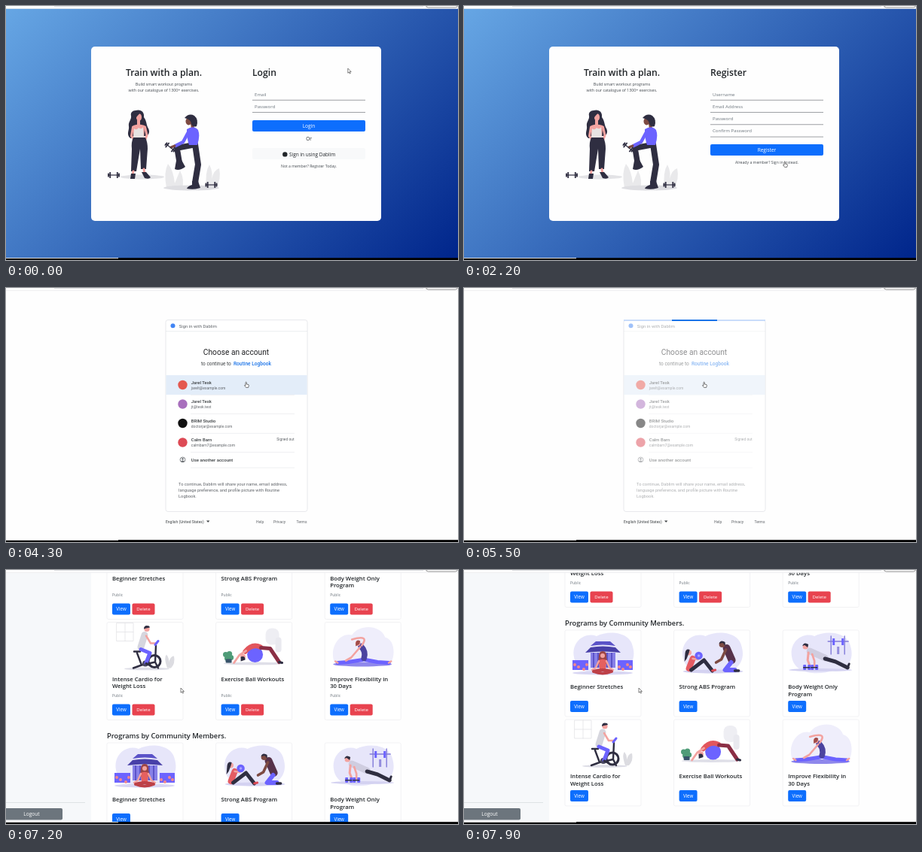
Write an HTML page that moves like this. It is 600 px wide and 338 px high and loops after 8 s.

```html
<!DOCTYPE html>
<html lang="en">
<head>
<meta charset="utf-8">
<title>Workout app walkthrough</title>
<style>
html, body { margin: 0; width: 100%; height: 100%; overflow: hidden; background: #fff; }
svg { display: block; width: 100vw; height: 100vh; }
text { font-family: "Open Sans", "Noto Sans", sans-serif; white-space: pre; }
.account text { font-family: Roboto, Arial, sans-serif; }
</style>
</head>
<body>
<svg id="stage" viewBox="0 0 600 338" preserveAspectRatio="none"></svg>
<script>
const LOOP = 8000, STEP = 100;
const INK = '#212529', BLUE = '#0d6efd', NAVY = '#2f2e41', VIOLET = '#6c63ff';
const SKIN = '#f3a3a0', BROWN = '#7d4a42', RED = '#dc4b56', HAZE = '#e7e6fa';

const text = (x, y, size, str, fill = INK, extra = '') =>
  `<text x="${x}" y="${y}" font-size="${size}" fill="${fill}" ${extra}>${str}</text>`;
const BOLD = 'font-weight="600"', MID = 'text-anchor="middle"', END = 'text-anchor="end"';
const box = (x, y, w, h, fill, r = 0, extra = '') =>
  `<rect x="${x}" y="${y}" width="${w}" height="${h}" rx="${r}" fill="${fill}" ${extra}/>`;
const dot = (x, y, r, fill) => `<circle cx="${x}" cy="${y}" r="${r}" fill="${fill}"/>`;
const oval = (x, y, rx, ry, fill) => `<ellipse cx="${x}" cy="${y}" rx="${rx}" ry="${ry}" fill="${fill}"/>`;
const shape = (d, fill) => `<path d="${d}" fill="${fill}"/>`;
const limb = (d, color, w) =>
  `<path d="${d}" fill="none" stroke="${color}" stroke-width="${w}" stroke-linecap="round" stroke-linejoin="round"/>`;
const group = (id, body, extra = '') => `<g id="${id}" ${extra}>${body}</g>`;
const button = (x, y, w, h, fill, label, size, color = '#fff') =>
  box(x, y, w, h, fill, 2) + text(x + w / 2, y + h / 2 + size * .36, size, label, color, MID);

// Login and register
function dumbbell(x, y, turn = 0) {
  const plates = [-7, -4.8, 4.8, 7].map(p => {
    const h = Math.abs(p) > 6 ? 5 : 8;
    return box(p - .9, -h / 2, 1.8, h, NAVY, .5);
  });
  return `<g transform="translate(${x} ${y}) rotate(${turn})">${box(-8, -.6, 16, 1.2, NAVY)}${plates.join('')}</g>`;
}

function athletes() {
  const standing =
    oval(181, 227.5, 29, 3, '#e3e3e6') +
    shape('M172 139C179 137 184 141 183 148C187 153 186 158 189 163C192 169 188 174 184 173L165 176C159 171 164 165 163 160C162 154 167 151 166 146C165 142 168 139 172 139Z', NAVY) +
    limb('M176 150V160', SKIN, 4) + oval(176.5, 148, 3.6, 5, SKIN) +
    shape('M169 159Q176 156 184 159L183 177H169Z', SKIN) +
    limb('M168.5 161L166.5 173L171 179', SKIN, 3) +
    limb('M184.5 161L187 172L184 180', SKIN, 3) +
    shape('M170 163Q173 166 176 162Q180 165 182 161L183 176H169Z', '#e7e3e2') +
    shape('M169 175H185Q188 181 188 190L186 217H179L178 190L173 220H166L167 190Q166 181 169 175Z', NAVY) +
    limb('M169 220L168 225', SKIN, 3) + limb('M183 217L184 224', SKIN, 3) +
    shape('M166 223H172L171 230H165Z', NAVY) + shape('M180 221L186 221L192 228Q190 231 184 229Z', NAVY) +
    shape('M168 143Q174 138 180 142Q173 144 170 157Q166 150 168 143Z', NAVY) +
    dumbbell(143, 225);
  const stepping =
    shape('M266 241Q264 221 270 211Q275 221 273 230Q276 218 283 216Q286 230 279 242Z', '#e9e9eb') +
    shape('M213 242Q209 221 215 210Q222 218 224 236L231 219Q237 230 234 243Z', '#e9e9eb') +
    oval(246, 242, 37, 3.5, '#dedee2') +
    limb('M251 184L255 211L251 235', NAVY, 8) + limb('M248 185L227 189L230 207', NAVY, 7.5) +
    shape('M226 206L233 205L238 214Q230 220 224 217Z', NAVY) +
    shape('M247 233H255L258 242Q249 245 240 243Q241 240 247 238Z', NAVY) +
    limb('M247 156L248 164', BROWN, 4) + oval(242.5, 153.5, 4, 5, BROWN) +
    shape('M237 149Q243 142 250 146Q256 151 253 160Q248 162 246 157Q246 151 237 149Z', NAVY) +
    shape('M240 164Q249 158 255 165Q258 173 254 185H243Q240 177 240 164Z', VIOLET) +
    limb('M242 168L235 181L225 186', VIOLET, 4.5) + limb('M224 186L219 188', BROWN, 3) +
    dumbbell(218, 188, 38) + dumbbell(272.5, 238);
  return standing + stepping;
}

const fields = (names, gap) => names.map((name, i) =>
  text(330, 119.5 + i * gap, 6.1, name, '#6c757d') +
  box(327, 124.8 + i * gap, 150, .8, '#85898e')).join('');

function authPages() {
  return group('auth',
    box(0, 0, 600, 338, 'url(#sky)') + box(113, 54, 385, 232, '#fefefe', 5) +
    text(209.5, 92.5, 12.2, 'Train with a plan.', INK, BOLD + MID) +
    text(209.5, 106, 5.3, 'Build smart workout programs', '#444a50', MID) +
    text(209.5, 114.4, 5.3, 'with our catalogue of 1300+ exercises.', '#444a50', MID) +
    athletes() +
    group('login',
      text(327, 92.5, 12.2, 'Login', INK, BOLD) + fields(['Email', 'Password'], 16.2) +
      button(327, 152, 150, 15, BLUE, 'Login', 6.5) +
      text(402, 178.5, 6.5, 'Or', INK, MID) +
      box(327, 189, 150, 15, '#f8f9fa', 2, 'id="sso"') + dot(370.3, 197.4, 3.2, INK) +
      text(376, 199.6, 6.5, 'Sign in using Dablim') +
      text(402, 215.3, 5.1, 'Not a member? Register Today.', '#444a50', MID)) +
    group('register',
      text(327, 92.5, 12.2, 'Register', INK, BOLD) +
      fields(['Username', 'Email Address', 'Password', 'Confirm Password'], 16.3) +
      button(327, 184, 150, 15, BLUE, 'Register', 6.5) +
      text(402, 210, 5.15, 'Already a member? Sign in instead.', '#444a50', MID)));
}

// Account chooser
function accountPage() {
  const people = [
    ['Jarel Tesk', 'jarelt@example.com', '#e4584f'],
    ['Jarel Tesk', 'jt@tesk.test', '#a86fbd'],
    ['BRIM Studio', 'doctorjar@example.com', '#111'],
    ['Calm Barn', 'calmbarn7@example.com', '#dd4a55']];
  const rows = people.map(([name, mail, color], i) => {
    const y = 129 + i * 25.5;
    return dot(234.5, y, 6.2, color) + text(245.8, y - 1.2, 5.9, name, '#3c4043', 'font-weight="500"') +
      text(245.8, y + 5.5, 5, mail, '#5f6368') + box(245, y + 12.9, 138, .6, '#e4e6e9');
  }).join('');
  const note = ['To continue, Dablim will share your name, email address,',
    'language preference, and profile picture with Routine', 'Logbook.'];
  const grey = '#5f6368';
  return group('account',
    box(0, 0, 600, 338, '#fefefe') +
    group('panel',
      box(212, 42.5, 188, 255, '#fff', 3, 'stroke="#e2e4e8" stroke-width=".8"') +
      group('choices',
        dot(221.5, 50.3, 3, '#4285f4') + text(229.8, 52.6, 5.9, 'Sign in with Dablim', grey) +
        box(212, 57, 188, .6, '#e2e4e8') +
        text(305.5, 89.3, 10.2, 'Choose an account', '#202124', MID) +
        text(259, 103.4, 6.5, 'to continue to', '#3c4043') +
        text(302, 103.4, 6.6, 'Routine Logbook', '#1a73e8', 'font-weight="500"') +
        box(212.4, 116, 187.2, 26, '#e3edf9', 0, 'id="row"') + rows +
        text(382.5, 202.6, 4.9, 'Signed out', grey, END) +
        `<circle cx="234.5" cy="228.5" r="3.4" fill="none" stroke="${grey}" stroke-width=".8"/>` +
        dot(234.5, 227.4, 1.2, grey) + shape('M232.3 230.8Q234.5 228.4 236.7 230.8Q234.5 232.4 232.3 230.8Z', grey) +
        text(245.8, 230.6, 6, 'Use another account', '#3c4043', 'font-weight="500"') +
        box(245, 238.8, 138, .6, '#e4e6e9') +
        note.map((line, i) => text(229, 262.5 + i * 8.3, 5.75, line, grey)).join('')) +
      group('footer',
        text(212, 312.6, 5, 'English (United States)', '#3c4043') + shape('M266 309.6H270.4L268.2 312Z', '#3c4043') +
        text(332, 312.6, 5, 'Help', grey) + text(355, 312.6, 5, 'Privacy', grey) + text(399.5, 312.6, 5, 'Terms', grey, END)) +
      group('progress', box(212, 42, 188, 2, '#c9dcfa') + box(212, 42, 60, 2, '#1a73e8', 0, 'id="bar"'))),
    'class="account"');
}

// Program thumbnails, in card coordinates
const blob = shape('M12 36C8 16 26 2 42 8C58 0 86 2 90 22C96 42 82 57 66 54C48 60 16 60 12 36Z', HAZE);
const thumbs = [
  blob + oval(50, 57, 40, 2.5, '#d8d6f3') +
    shape('M27 30Q50 27 74 30L67 23Q50 20 34 23Z', '#4840a8') + shape('M34 21Q50 18 67 21L60 15H41Z', '#5b53c8') +
    box(34, 30, 33, 20, '#8780e8') + [37, 43, 55, 61].map(x => box(x, 30, 2, 20, '#5b53c8')).join('') +
    box(10, 40, 21, 13, VIOLET) + box(70, 40, 20, 13, VIOLET) +
    [13, 18, 25, 29, 72, 77, 83, 87].map((x, i) => dot(x, 46 + i % 3 * 3, 2, '#f2878c')).join('') +
    shape('M45 35Q45 28 50 28Q56 28 55 36L57 45H44Z', '#9c4545') + dot(50, 34, 3, SKIN) +
    shape('M45 40Q50 37 55 40L54 53H46Z', '#e5605f') +
    limb('M45 41L41 50L36 53M55 41L59 50L64 53', SKIN, 2.4) + limb('M38 55Q50 51 62 55Q50 60 38 55', '#bd4047', 4),
  blob + oval(52, 55, 40, 2.5, '#d4d2f1') +
    limb('M25 38L20 51', '#e55c63', 8) + limb('M23 53L40 40L51 54', NAVY, 5) + limb('M51 54L55 53', RED, 3) +
    limb('M25 38L32 39', SKIN, 2.5) + dot(20, 30, 3.4, SKIN) +
    shape('M15 30Q16 24 21 26L20 30L17 38L14 42Z', NAVY) + dot(33, 34, 5.2, VIOLET) + dot(33, 34, 1.8, '#a9a4ff') +
    limb('M70 24L77 40', '#57324a', 10) + limb('M76 43L68 53H81', VIOLET, 6) + limb('M81 54L86 54', NAVY, 3.5) +
    limb('M69 26L63 39L56 43', BROWN, 3.6) + dot(64, 19, 4, BROWN) + shape('M60 18Q62 12 68 16L68 21L65 17Z', NAVY),
  blob + oval(50, 53, 42, 2, '#d4d2f1') +
    limb('M64 8V32M82 8V32M60 15H87', '#817ad9', 1.4) + box(66, 11, 3, 9, VIOLET) + box(78, 11, 3, 9, VIOLET) +
    box(72, 22, 3, 10, '#938cdd') + limb('M36 28L56 37', '#cfcde0', 9) +
    limb('M56 38L70 42L86 50', NAVY, 5) + limb('M86 50L88 45', NAVY, 3) +
    limb('M34 30L33 40L36 48', SKIN, 3) + limb('M39 32L42 41L42 48', SKIN, 2.6) +
    dot(30, 22, 3.6, SKIN) + shape('M26 21Q28 15 34 19L33 23L29 20Z', NAVY) +
    [27, 37].map(x => box(x, 46, 4, 7, VIOLET, 1) + box(x + 6, 46, 4, 7, VIOLET, 1) + box(x, 49, 9, 1.5, NAVY)).join(''),
  limb('M13 1H35V25H13ZM24 1V25M13 13H35', '#e2e2e6', .8) + oval(53, 62, 30, 1.8, '#dddde6') +
    shape('M80 61Q75 47 79 43Q83 48 82 54Q84 45 89 45Q91 55 85 61Z', '#dcdce1') +
    limb('M40 41L46 57L64 53L65 31M46 57L35 61M64 53L68 61M36 39H44', NAVY, 2.4) +
    `<circle cx="63" cy="52" r="8" fill="none" stroke="${NAVY}" stroke-width="3"/>` + dot(51, 55, 4, '#4a4860') +
    limb('M50 17L45 33', '#d6d6de', 9) + limb('M45 36L57 41L52 54', VIOLET, 5) + limb('M52 55L57 57', NAVY, 3) +
    limb('M52 18L58 28L66 28', SKIN, 2.5) + limb('M64 30L68 25', VIOLET, 3) +
    dot(53, 9, 3.6, SKIN) + shape('M49 9Q49 3 56 5L57 7L52 8Z', NAVY),
  box(66, 8, 18, 22, '#eeeef3', 8) + box(79, 20, 8, 20, '#e9e9ef', 4) + oval(50, 55, 40, 2, '#dfdfe8') +
    dot(52, 43, 10.5, VIOLET) +
    [[13, 43], [18, 42], [15, 48], [20, 47]].map(([x, y]) => dot(x, y, 3.6, '#4f9c78')).join('') + box(13, 49, 8, 5, '#38546a', 1) +
    limb('M39 39Q48 28 59 33', '#e2565d', 6.5) + limb('M60 34L72 35L84 53', '#8b2f45', 5) + limb('M84 53L88 54', NAVY, 3) +
    limb('M40 38L31 44L24 54', SKIN, 2.8) + dot(36, 46, 3.4, SKIN) + shape('M33 46Q39 44 39 50L33 52Z', NAVY),
  shape('M12 52C6 30 22 13 36 17C46 2 74 3 80 20C94 24 93 46 88 53Z', '#efeefb') + oval(50, 56, 39, 3, '#8f88ec') +
    limb('M50 50L31 53L17 54M54 50L70 53L85 54', VIOLET, 5) + limb('M17 54L14 52M85 54L88 52', SKIN, 2.6) +
    limb('M52 48Q55 39 48 32', '#4b439f', 7.5) + limb('M49 31Q60 16 36 23', SKIN, 2.6) + limb('M47 33L35 47L28 51', SKIN, 2.6) +
    dot(44, 28, 3.4, SKIN) + shape('M41 28Q42 22 47 25L46 29L41 32Z', '#a04d49')
];

// Dashboard
const titles = [['Beginner Stretches'], ['Strong ABS Program'], ['Body Weight Only', 'Program'],
  ['Intense Cardio for', 'Weight Loss'], ['Exercise Ball Workouts'], ['Improve Flexibility in', '30 Days']];

function card(i, y, mine) {
  const x = 134 + i % 3 * 144.6, h = mine ? 130 : 115, by = y + (mine ? 109 : 94);
  return box(x, y, 101, h, '#fff', 2, 'stroke="#ececef" stroke-width=".7"') +
    `<g class="${mine && i > 2 ? 'late' : ''}" transform="translate(${x} ${y})">${thumbs[i]}</g>` +
    titles[i].map((line, n) => text(x + 7, y + 78 + n * 9.8, 7.7, line, INK, BOLD)).join('') +
    (mine ? text(x + 7, y + 99.5, 5, 'Public', '#6c757d') : '') +
    button(x + 7, by, 24, 15, BLUE, 'View', 6.2) +
    (mine ? `<g class="del">${button(x + 33.5, by, 30, 15, 'currentColor', 'Delete', 6.1)}</g>` : '');
}

const cards = (y, mine) => titles.map((_, i) => card(i, y + (i > 2 ? (mine ? 134 : 119) : 0), mine)).join('');

function dashboard() {
  const link = '#0b57c8';
  const nav = box(-3, 46, 109.5, 15.5, '#0a53cb', 2) +
    ['Home', 'Body Metrics', 'Account', 'About'].map((name, i) =>
      text([71, 67.5, 70, 71][i], 56.6 + i * 21.3, 6.35, name, i ? link : '#fff', MID)).join('') +
    shape('M33.4 55L37.2 51.3L41 55H40V58H38.2V55.6H36.2V58H34.4V55Z', '#fff') +
    [0, 1, 2, 3].map(i => box(27.3 + i * 1.8, 77 - i * 1.4, 1.3, 2 + i * 1.4, link)).join('') +
    dot(35, 95.8, 1.6, link) + shape('M32.2 100.6Q32.4 97.7 35 97.7Q37.6 97.7 37.8 100.6Z', link) +
    dot(37.3, 118.6, 3.3, link) + box(36.9, 118, .9, 2.6, '#fff') + dot(37.3, 116.9, .5, '#fff');
  return group('dash',
    box(0, 0, 600, 338, '#fefefe') + box(0, 0, 113, 338, '#f6f8fa') +
    group('scroll',
      text(11.5, 22.5, 9.35, 'Routine Logbook', '#0b63d8') + box(0, 33.6, 105, .7, '#d5d8dc') + nav +
      box(134, 14, 480, 14, '#f4f5f7', 4) +
      text(141, 23.3, 6.3, 'Browse our catalogue of 1300+ workouts', '#5c636a') +
      text(134, 57.3, 15.6, 'Hello,', INK, BOLD) + text(134, 74, 11.9, 'Jarel Tesk', INK, 'font-weight="300"') +
      text(134, 102.3, 9.1, 'Your Programs.', INK, BOLD) + button(569.5, 92.5, 33, 15.5, BLUE, 'Add New', 5.2) +
      group('cards', cards(108, true) +
        text(134, 396.5, 9.3, 'Programs by Community Members.', INK, BOLD) + cards(402.5, false))) +
    box(0, 309, 105, .7, '#d5d8dc') + box(-3, 317, 78, 15.5, '#6c757d', 2) +
    text(34, 327.2, 6.6, 'Logout', '#fff', MID));
}

const chrome =
  group('status', box(-3, 327, 201, 9, '#dfe1e5', 1) + text(-.5, 333.3, 4.9, 'ng for meetlookup.com...', '#3c4043')) +
  box(0, 0, 600, 3.6, '#fdfdfd') + box(64, 0, 490, .7, '#d3d5d8') + box(0, 3, 600, .6, '#e6e7ea') +
  box(557.5, -6, 42, 8, '#fff', 3, 'stroke="#777" stroke-width=".8"') +
  box(0, 336, 600, 2, '#000') + box(149, 335.2, 451, 1, '#000') + box(0, 335, 149, 1, '#dcdcdc');

const pointer =
  `<path id="arrow" d="M0 0V6.2L1.5 4.9L2.5 7.1L3.5 6.6L2.5 4.5H4.4Z" fill="#fff" stroke="#333" stroke-width=".6"/>` +
  `<path id="hand" d="M0 .6Q.7 -.4 1.3 .6V3L4 3.6Q4.5 4 4.3 5L3.7 7.4H.6L-1.5 4.7Q-1.3 3.8 0 4.6Z" fill="#fff" stroke="#222" stroke-width=".6"/>`;

const stage = document.getElementById('stage');
stage.innerHTML = `<defs><linearGradient id="sky" gradientUnits="userSpaceOnUse" x1="67" y1="-63" x2="533" y2="403">
  <stop stop-color="#66a6e4"/><stop offset="1" stop-color="#00258b"/></linearGradient></defs>` +
  authPages() + accountPage() + dashboard() + chrome + group('cursor', pointer);

const el = id => document.getElementById(id);
const show = (id, on) => { el(id).style.display = on ? '' : 'none'; };
const within = (t, a, b) => t >= a && t < b;
const smooth = k => k * k * (3 - 2 * k);

// Keys are [time, ...values]
function track(keys, t, ease = k => k) {
  const i = keys.findIndex(key => key[0] > t);
  if (i === 0) return keys[0].slice(1);
  if (i < 0) return keys[keys.length - 1].slice(1);
  const a = keys[i - 1], b = keys[i], k = ease((t - a[0]) / (b[0] - a[0]));
  return a.slice(1).map((v, n) => v + (b[n + 1] - v) * k);
}

const cursorKeys = [[0, 453.8, 83], [200, 453.8, 83], [800, 422, 211], [1000, 422, 211], [1400, 382, 222],
  [1800, 382, 222], [2200, 425, 207], [2400, 425, 207], [2800, 400, 194], [3400, 400, 194],
  [4000, 318, 125], [6500, 318, 125], [7000, 232, 157]];
const scrollKeys = [[6800, 0], [7200, 172.5], [7700, 322.5]];
const handTimes = [[700, 1000], [2100, 2400], [2700, 3200], [3900, 6100]];
const late = stage.querySelectorAll('.late'), deletes = stage.querySelectorAll('.del');

function draw(t) {
  show('auth', t < 3200);
  show('register', within(t, 1000, 2400));
  show('login', !within(t, 1000, 2400));
  el('sso').setAttribute('fill', within(t, 2700, 3200) ? '#dfe2e6' : '#f8f9fa');

  show('account', within(t, 3200, 6300));
  show('panel', t < 6100);
  show('choices', t >= 3500);
  show('footer', t >= 3500);
  show('row', t >= 3900);
  show('progress', t >= 5000);
  el('choices').setAttribute('opacity', t >= 5000 ? .5 : 1);
  const head = (t - 5000) % 1000 / 1000 * 248 - 60;
  const left = Math.max(0, head), right = Math.min(188, head + 60);
  el('bar').setAttribute('x', 212 + left);
  el('bar').setAttribute('width', Math.max(0, right - left));

  show('dash', t >= 6300);
  el('scroll').setAttribute('transform', `translate(0 ${-track(scrollKeys, t)[0]})`);
  el('cards').setAttribute('opacity', track([[6400, 0], [6500, .16], [6900, 1]], t)[0]);
  late.forEach(g => { g.style.display = t < 6600 ? 'none' : ''; });
  deletes.forEach(g => { g.style.color = t < 6600 ? '#5c636a' : '#e8434f'; });

  show('status', within(t, 2900, 4300));
  const hand = handTimes.some(([a, b]) => within(t, a, b));
  show('hand', hand);
  show('arrow', !hand);
  el('cursor').setAttribute('transform', `translate(${track(cursorKeys, t, smooth).join(' ')})`);
}

function tick() {
  draw(Math.floor(performance.now() % LOOP / STEP) * STEP);
  requestAnimationFrame(tick);
}
tick();
</script>
</body>
</html>
```
